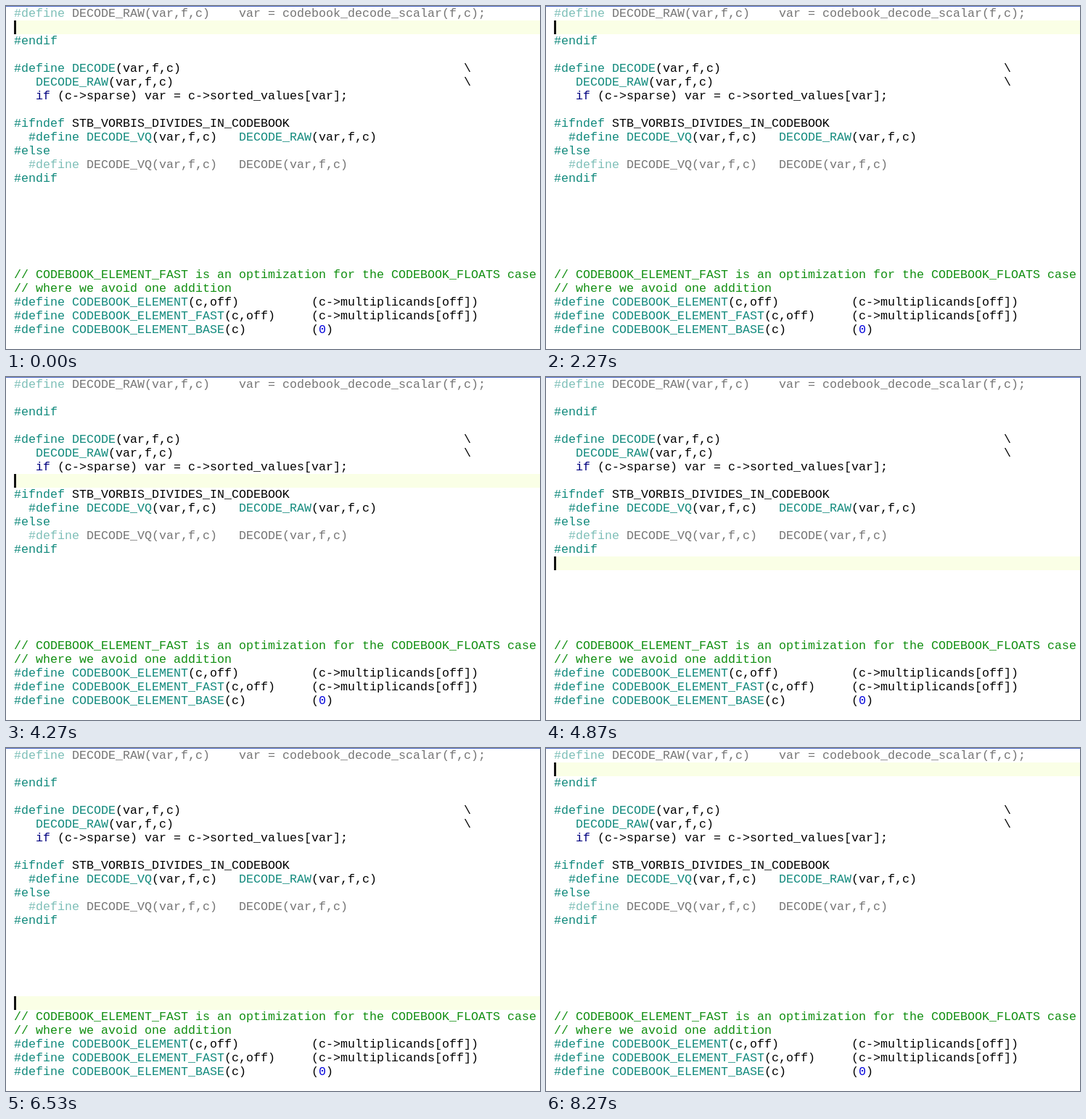
Write an HTML page that moves like this. It is 736 by 474 pixels and loops after 9540 ms.

```html
<!DOCTYPE html>
<html lang="en">
<head>
<meta charset="utf-8">
<title>Code navigation</title>
<style>
  html, body { margin: 0; width: 100%; height: 100%; overflow: hidden; background: #fff; }
  #stage { position: relative; width: 736px; height: 474px; overflow: hidden; }
  #stage::before { content: ""; position: absolute; top: 0; left: 0; width: 100%; height: 1px; background: #4a66c4; }
  #line { position: absolute; top: 1px; left: 11px; right: 0; height: 19px; background: #faffe6; }
  #line::before { content: ""; position: absolute; left: 0; top: 0; width: 3px; height: 19px; background: #111; }
  .row { position: absolute; left: 11px; height: 19px; }
  .row span {
    position: absolute; top: 0; white-space: pre; color: #000;
    font: 16.664px/19px "Liberation Mono", monospace;
  }
  .row .macro { color: #128a7d; }
  .row .note { color: #118f11; }
  .row .key { color: #000080; }
  .row .num { color: #0000dc; }
  .dim { opacity: .54; }
  .dim .macro:not(.hash) { color: #000; }
</style>
</head>
<body>
<div id="stage"><div id="line"></div></div>
<script>
const LOOP = 9540, ROW = 19, COL = 10;
const stage = document.getElementById("stage");

const code = String.raw`#define DECODE_RAW(var,f,c)    var = codebook_decode_scalar(f,c);

#endif

#define DECODE(var,f,c)                                       \
   DECODE_RAW(var,f,c)                                        \
   if (c->sparse) var = c->sorted_values[var];

#ifndef STB_VORBIS_DIVIDES_IN_CODEBOOK
  #define DECODE_VQ(var,f,c)   DECODE_RAW(var,f,c)
#else
  #define DECODE_VQ(var,f,c)   DECODE(var,f,c)
#endif






// CODEBOOK_ELEMENT_FAST is an optimization for the CODEBOOK_FLOATS case
// where we avoid one addition
#define CODEBOOK_ELEMENT(c,off)          (c->multiplicands[off])
#define CODEBOOK_ELEMENT_FAST(c,off)     (c->multiplicands[off])
#define CODEBOOK_ELEMENT_BASE(c)         (0)`;

const inactive = [0, 11];

function kind(word, text) {
  if (text.startsWith("//")) return "note";
  if (word[0] === "#") return "macro hash";
  if (/^(DECODE|CODEBOOK_ELEMENT)/.test(word)) return "macro";
  if (word === "if") return "key";
  return word === "0" ? "num" : "";
}

code.split("\n").forEach((text, i) => {
  const row = document.createElement("div");
  row.className = inactive.includes(i) ? "row dim" : "row";
  row.style.top = 1 + i * ROW + "px";
  for (const m of text.matchAll(/#?\w+|[^\w\s]+/g)) {
    const span = document.createElement("span");
    span.className = kind(m[0], text);
    span.textContent = m[0];
    span.style.left = m.index * COL + "px";
    row.append(span);
  }
  stage.append(row);
});

// [time in ms, row the cursor jumps to]
const jumps = [
  [0, 1], [3670, 3], [4130, 7], [4870, 13], [5530, 24],
  [6530, 18], [7200, 7], [7670, 3], [8130, 1], [LOOP, 1]
];

document.getElementById("line").animate(
  jumps.map(([time, row]) => ({
    offset: time / LOOP,
    transform: `translateY(${row * ROW}px)`,
    easing: "step-end"
  })),
  { duration: LOOP, iterations: Infinity }
);
</script>
</body>
</html>
```
